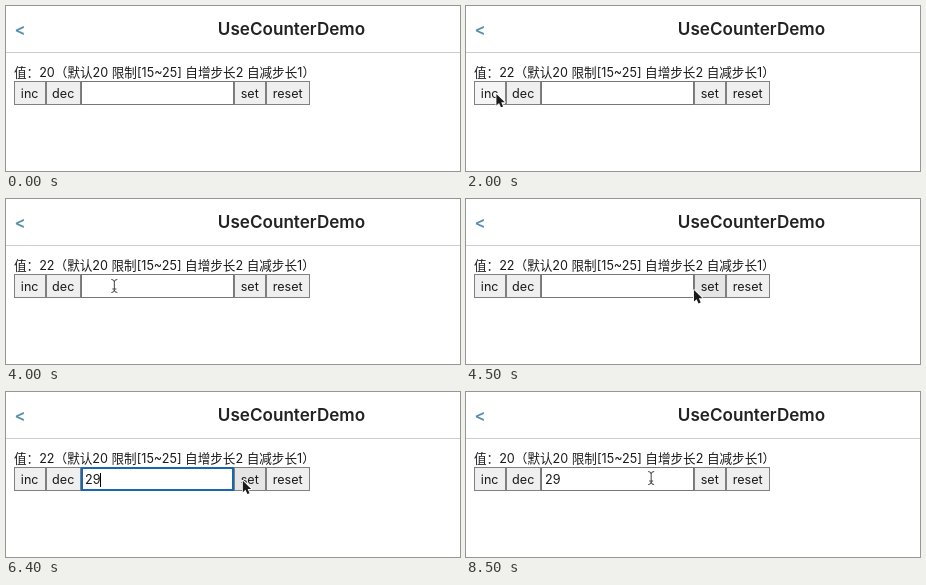
Animation, 454 px wide and 165 px high, one loop 10 s. Source, as an HTML page with a canvas:

```html
<!DOCTYPE html>
<html lang="zh-CN">
<head>
<meta charset="utf-8">
<title>Counter demo</title>
<style>
  html, body { margin: 0; width: 100%; height: 100%; overflow: hidden; background: #fff; }
  canvas { display: block; }
</style>
</head>
<body>
<canvas id="stage" width="454" height="165"></canvas>
<script>
const ctx = document.getElementById('stage').getContext('2d');
const LOOP = 10000, STEP = 100;
const FONT = 'Inter, "Noto Sans CJK SC", "Noto Sans CJK", sans-serif';
const LEFT = 8, TOP = 75, HEIGHT = 24;
const INITIAL = 20, MIN = 15, MAX = 25, UP = 2, DOWN = 1;
const TYPED = '29', TYPE_START = 5400, TYPE_GAP = 400;

// Controls sit side by side, so each starts where the previous one ends.
const controls = {};
let edge = LEFT;
for (const [name, w] of Object.entries({ inc: 32, dec: 35, input: 153, set: 32, reset: 44 })) {
  controls[name] = { x: edge, w };
  edge += w;
}

const clicks = [
  [1400, 'inc'], [2100, 'inc'], [3300, 'dec'], [3500, 'dec'],
  [5100, 'input'], [6600, 'set'], [8200, 'reset']
];

const actions = {
  inc: value => value + UP,
  dec: value => value - DOWN,
  set: () => Number(TYPED),
  reset: () => INITIAL,
  input: value => value
};

// Pointer moves: start, end, and the spot reached as a share of the control's box.
const moves = [
  [200, 1200, 'inc', 0.7, 0.54],
  [2200, 2700, 'dec', 0.37, 0.42],
  [3700, 4500, 'set', 0, 0.67],
  [4500, 4600, 'input', 0.85, 0.96],
  [5800, 6600, 'set', 0.46, 0.5],
  [7000, 7200, 'reset', 0.48, 0.27],
  [8200, 8500, 'input', 0.72, 0.46]
];

const ease = k => k * k * (3 - 2 * k);
const clamp = (v, lo, hi) => Math.min(hi, Math.max(lo, v));
const inside = (box, p) => p && p.x >= box.x && p.x < box.x + box.w && p.y >= TOP && p.y < TOP + HEIGHT;

function pointerAt(t) {
  if (t <= moves[0][0]) return null;
  const p = { x: 150, y: 168 };
  for (const [start, end, name, across, down] of moves) {
    const k = ease(clamp((t - start) / (end - start), 0, 1));
    p.x += (controls[name].x + across * controls[name].w - p.x) * k;
    p.y += (TOP + down * HEIGHT - p.y) * k;
  }
  return p;
}

function stateAt(t) {
  const done = clicks.filter(([time]) => time <= t);
  const value = done.reduce((v, [, name]) => clamp(actions[name](v), MIN, MAX), INITIAL);
  const pressed = clicks.find(([time]) => Math.abs(t - time) <= STEP)?.[1];
  const focused = done.at(-1)?.[1] === 'input' && pressed !== 'set';
  const count = clamp(Math.floor((t - TYPE_START) / TYPE_GAP) + 1, 0, TYPED.length);
  return { value, pressed, focused, typed: TYPED.slice(0, count) };
}

function text(str, x, y, { size = 12.6, weight = 400, color = '#1a1a1a', align = 'left' } = {}) {
  ctx.font = `${weight} ${size}px ${FONT}`;
  ctx.fillStyle = color;
  ctx.textAlign = align;
  ctx.fillText(str, x, y);
  return ctx.measureText(str).width;
}

function box({ x, w }, fill, stroke, line = 1) {
  ctx.fillStyle = fill;
  ctx.fillRect(x, TOP, w, HEIGHT);
  ctx.strokeStyle = stroke;
  ctx.lineWidth = line;
  ctx.strokeRect(x + line / 2, TOP + line / 2, w - line, HEIGHT - line);
}

function drawArrow({ x, y }) {
  ctx.save();
  ctx.translate(x, y);
  ctx.scale(0.88, 0.88);
  ctx.lineJoin = 'round';
  ctx.lineWidth = 2;
  ctx.strokeStyle = '#fff';
  ctx.fillStyle = '#1a1a1a';
  const arrow = new Path2D('M0 0V13L3 10.3L5.2 15.2L7.6 14.2L5.5 9.4H9.5Z');
  ctx.stroke(arrow);
  ctx.fill(arrow);
  ctx.restore();
}

function drawBeam({ x, y }) {
  ctx.save();
  ctx.translate(x, y);
  ctx.lineWidth = 1;
  ctx.strokeStyle = '#444';
  ctx.stroke(new Path2D('M-3 -6.5Q0 -6.5 0 -4V4Q0 6.5 -3 6.5M3 -6.5Q0 -6.5 0 -4M0 4Q0 6.5 3 6.5M-2 3H2'));
  ctx.restore();
}

function draw(t) {
  const pointer = pointerAt(t);
  const { value, pressed, focused, typed } = stateAt(t);
  const { input, ...buttons } = controls;
  ctx.fillStyle = '#fff';
  ctx.fillRect(0, 0, 454, 165);
  ctx.fillStyle = '#ccc';
  ctx.fillRect(0, 46, 454, 1);

  text('<', 8.5, 29, { size: 16.5, weight: 600, color: '#5590ae' });
  text('UseCounterDemo', 285.5, 29, { size: 17.1, weight: 600, color: '#222', align: 'center' });
  text(`值：${value}（默认${INITIAL} 限制[${MIN}~${MAX}] 自增步长${UP} 自减步长${DOWN}）`, 8, 70.5);

  for (const [name, button] of Object.entries(buttons)) {
    const fill = name === pressed ? '#f5f5f5' : inside(button, pointer) ? '#e5e5e5' : '#efefef';
    box(button, fill, '#808080');
    text(name, button.x + button.w / 2 - 0.3, 92, { align: 'center' });
  }

  box(input, '#fff', focused ? '#1766ae' : '#767676', focused ? 2 : 1);
  const width = text(typed, 79, 92);
  if (focused) {
    ctx.fillStyle = '#000';
    ctx.fillRect(Math.round(79 + width), 81, 1, 14);
  }
  if (pointer) (inside(input, pointer) ? drawBeam : drawArrow)(pointer);
}

function frame(now) {
  draw(Math.floor((now % LOOP) / STEP) * STEP);
  requestAnimationFrame(frame);
}
draw(0);
requestAnimationFrame(frame);
</script>
</body>
</html>
```
